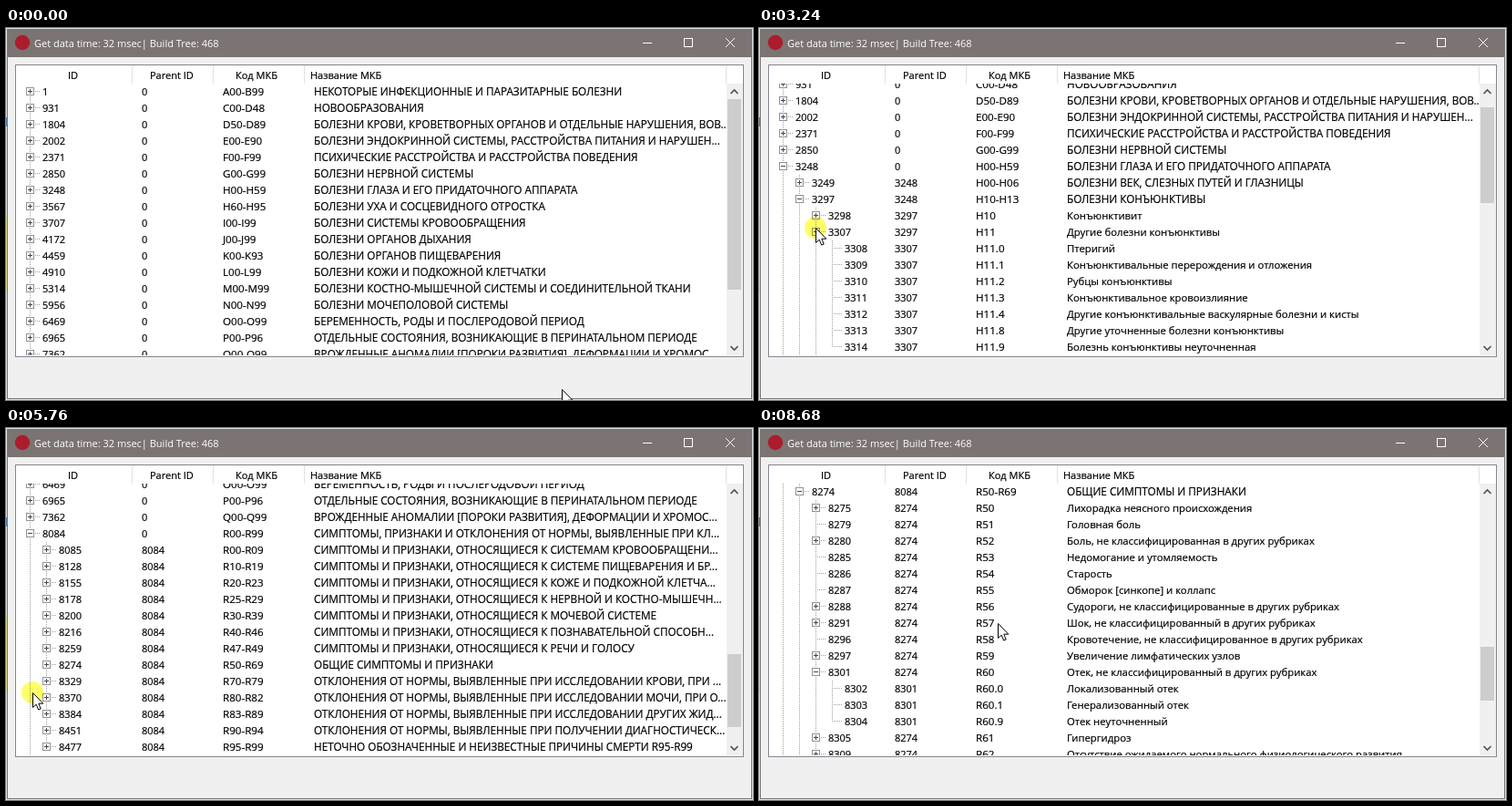
Animation of 820x408 px, one loop 9680 ms. Source, as an HTML page:

```html
<!DOCTYPE html>
<html lang="ru">
<head>
<meta charset="utf-8">
<title>Tree</title>
<style>
html, body { margin: 0; width: 100%; height: 100%; overflow: hidden; background: #f0f0f0; }
svg { display: block; }
text { font: 11px "Open Sans", "Noto Sans", sans-serif; fill: #000; stroke: #000; stroke-width: .2px; white-space: pre; }
.title { fill: #fff; stroke: none; }
.code { font-size: 11.6px; }
.caps { font-size: 11.73px; }
.mixed { font-size: 11.3px; }
.dots { fill: none; stroke: #a0a0a0; stroke-dasharray: 1 1; shape-rendering: crispEdges; }
.crisp { shape-rendering: crispEdges; }
</style>
</head>
<body>
<svg id="stage" width="820" height="408" viewBox="0 0 820 408">
  <defs><clipPath id="body"><rect x="11" y="61" width="779" height="298"/></clipPath></defs>
  <g class="crisp">
    <rect width="820" height="408" fill="#e2e2e2"/>
    <rect y="98" width="1" height="10" fill="#4a86b8"/>
    <rect y="206" width="1" height="84" fill="#e6e08a"/>
    <rect x="1" y="1" width="818" height="406" fill="#7b7472"/>
    <rect x="2" y="32" width="816" height="374" fill="#f0f0f0"/>
    <rect x="10" y="40" width="800" height="321" fill="#828790"/>
    <rect x="11" y="41" width="798" height="319" fill="#fff"/>
    <path d="M138.5 41V61M227.5 41V61M327.5 41V61M790.5 41V61" stroke="#e2e2e2"/>
    <rect x="791" y="61" width="18" height="298" fill="#f0f0f0"/>
    <path d="M699 16.5H709M744.5 11.5H753.5V20.5H744.5Z" fill="none" stroke="#fff"/>
  </g>
  <circle cx="18" cy="16" r="8.2" fill="#ab1d2c"/>
  <path d="M790 11L800 21M800 11L790 21" stroke="#fff"/>
  <text x="31" y="20.5" class="title">Get data time: 32 msec| Build Tree: 468</text>
  <text x="68" y="56">ID</text>
  <text x="158" y="56">Parent ID</text>
  <text x="252" y="56">Код МКБ</text>
  <text x="334" y="56">Название МКБ</text>
  <rect id="thumb" x="792" width="15" fill="#cdcdcd"/>
  <path d="M795.5 72L799.5 68L803.5 72M795.5 349L799.5 353L803.5 349" fill="none" stroke="#505050" stroke-width="1.6"/>
  <g id="rows" clip-path="url(#body)"></g>
  <circle id="halo" r="12" fill="#ffff6a" style="mix-blend-mode:multiply"/>
  <path id="cursor" d="M.5 .5V16.5L4.2 13.2 6.7 19 9.2 18 6.8 12.2H11.8Z" fill="#fff" stroke="#000"/>
</svg>
<script>
// One node per line: dots give the depth, "+" marks a node with children.
const source = `
+1 A00-B99 НЕКОТОРЫЕ ИНФЕКЦИОННЫЕ И ПАРАЗИТАРНЫЕ БОЛЕЗНИ
+931 C00-D48 НОВООБРАЗОВАНИЯ
+1804 D50-D89 БОЛЕЗНИ КРОВИ, КРОВЕТВОРНЫХ ОРГАНОВ И ОТДЕЛЬНЫЕ НАРУШЕНИЯ, ВОВ...
+2002 E00-E90 БОЛЕЗНИ ЭНДОКРИННОЙ СИСТЕМЫ, РАССТРОЙСТВА ПИТАНИЯ И НАРУШЕН...
+2371 F00-F99 ПСИХИЧЕСКИЕ РАССТРОЙСТВА И РАССТРОЙСТВА ПОВЕДЕНИЯ
+2850 G00-G99 БОЛЕЗНИ НЕРВНОЙ СИСТЕМЫ
+3248 H00-H59 БОЛЕЗНИ ГЛАЗА И ЕГО ПРИДАТОЧНОГО АППАРАТА
.+3249 H00-H06 БОЛЕЗНИ ВЕК, СЛЕЗНЫХ ПУТЕЙ И ГЛАЗНИЦЫ
.+3297 H10-H13 БОЛЕЗНИ КОНЪЮНКТИВЫ
..+3298 H10 Конъюнктивит
..+3307 H11 Другие болезни конъюнктивы
...3308 H11.0 Птеригий
...3309 H11.1 Конъюнктивальные перерождения и отложения
...3310 H11.2 Рубцы конъюнктивы
...3311 H11.3 Конъюнктивальное кровоизлияние
...3312 H11.4 Другие конъюнктивальные васкулярные болезни и кисты
...3313 H11.8 Другие уточненные болезни конъюнктивы
...3314 H11.9 Болезнь конъюнктивы неуточненная
..+3315 H13* Поражения конъюнктивы при болезнях, классифицированных в других рубри...
.+3321 H15-H22 БОЛЕЗНИ СКЛЕРЫ, РОГОВИЦЫ, РАДУЖНОЙ ОБОЛОЧКИ И ЦИЛИАРНОГО ТЕЛА
.+3376 H25-H28 БОЛЕЗНИ ХРУСТАЛИКА
.+3401 H30-H36 БОЛЕЗНИ СОСУДИСТОЙ ОБОЛОЧКИ И СЕТЧАТКИ
.+3446 H40-H42 ГЛАУКОМА
.+3460 H43-H45 БОЛЕЗНИ СТЕКЛОВИДНОГО ТЕЛА И ГЛАЗНОГО ЯБЛОКА
.+3483 H46-H48 БОЛЕЗНИ ЗРИТЕЛЬНОГО НЕРВА И ЗРИТЕЛЬНЫХ ПУТЕЙ
.+3498 H49-H52 БОЛЕЗНИ МЫШЦ ГЛАЗА, НАРУШЕНИЯ СОДРУЖЕСТВЕННОГО ДВИЖЕНИЯ ГЛА...
.+3532 H53-H54 ЗРИТЕЛЬНЫЕ РАССТРОЙСТВА И СЛЕПОТА
.+3552 H55-H59 ДРУГИЕ БОЛЕЗНИ ГЛАЗА И ЕГО ПРИДАТОЧНОГО АППАРАТА
+3567 H60-H95 БОЛЕЗНИ УХА И СОСЦЕВИДНОГО ОТРОСТКА
+3707 I00-I99 БОЛЕЗНИ СИСТЕМЫ КРОВООБРАЩЕНИЯ
+4172 J00-J99 БОЛЕЗНИ ОРГАНОВ ДЫХАНИЯ
+4459 K00-K93 БОЛЕЗНИ ОРГАНОВ ПИЩЕВАРЕНИЯ
+4910 L00-L99 БОЛЕЗНИ КОЖИ И ПОДКОЖНОЙ КЛЕТЧАТКИ
+5314 M00-M99 БОЛЕЗНИ КОСТНО-МЫШЕЧНОЙ СИСТЕМЫ И СОЕДИНИТЕЛЬНОЙ ТКАНИ
+5956 N00-N99 БОЛЕЗНИ МОЧЕПОЛОВОЙ СИСТЕМЫ
+6469 O00-O99 БЕРЕМЕННОСТЬ, РОДЫ И ПОСЛЕРОДОВОЙ ПЕРИОД
+6965 P00-P96 ОТДЕЛЬНЫЕ СОСТОЯНИЯ, ВОЗНИКАЮЩИЕ В ПЕРИНАТАЛЬНОМ ПЕРИОДЕ
+7362 Q00-Q99 ВРОЖДЕННЫЕ АНОМАЛИИ [ПОРОКИ РАЗВИТИЯ], ДЕФОРМАЦИИ И ХРОМОС...
+8084 R00-R99 СИМПТОМЫ, ПРИЗНАКИ И ОТКЛОНЕНИЯ ОТ НОРМЫ, ВЫЯВЛЕННЫЕ ПРИ КЛ...
.+8085 R00-R09 СИМПТОМЫ И ПРИЗНАКИ, ОТНОСЯЩИЕСЯ К СИСТЕМАМ КРОВООБРАЩЕНИ...
.+8128 R10-R19 СИМПТОМЫ И ПРИЗНАКИ, ОТНОСЯЩИЕСЯ К СИСТЕМЕ ПИЩЕВАРЕНИЯ И БР...
.+8155 R20-R23 СИМПТОМЫ И ПРИЗНАКИ, ОТНОСЯЩИЕСЯ К КОЖЕ И ПОДКОЖНОЙ КЛЕТЧА...
.+8178 R25-R29 СИМПТОМЫ И ПРИЗНАКИ, ОТНОСЯЩИЕСЯ К НЕРВНОЙ И КОСТНО-МЫШЕЧН...
.+8200 R30-R39 СИМПТОМЫ И ПРИЗНАКИ, ОТНОСЯЩИЕСЯ К МОЧЕВОЙ СИСТЕМЕ
.+8216 R40-R46 СИМПТОМЫ И ПРИЗНАКИ, ОТНОСЯЩИЕСЯ К ПОЗНАВАТЕЛЬНОЙ СПОСОБН...
.+8259 R47-R49 СИМПТОМЫ И ПРИЗНАКИ, ОТНОСЯЩИЕСЯ К РЕЧИ И ГОЛОСУ
.+8274 R50-R69 ОБЩИЕ СИМПТОМЫ И ПРИЗНАКИ
..+8275 R50 Лихорадка неясного происхождения
..8279 R51 Головная боль
..+8280 R52 Боль, не классифицированная в других рубриках
..8285 R53 Недомогание и утомляемость
..8286 R54 Старость
..8287 R55 Обморок [синкопе] и коллапс
..+8288 R56 Судороги, не классифицированные в других рубриках
..+8291 R57 Шок, не классифицированный в других рубриках
..8296 R58 Кровотечение, не классифицированное в других рубриках
..+8297 R59 Увеличение лимфатических узлов
..+8301 R60 Отек, не классифицированный в других рубриках
...8302 R60.0 Локализованный отек
...8303 R60.1 Генерализованный отек
...8304 R60.9 Отек неуточненный
..+8305 R61 Гипергидроз
..+8309 R62 Отсутствие ожидаемого нормального физиологического развития
..+8313 R63 Симптомы и признаки, относящиеся к приему пищи и жидкости
..8322 R64 Кахексия
..+8323 R68 Другие общие симптомы и признаки
..8328 R69 Неизвестные и неуточненные причины заболевания
.+8329 R70-R79 ОТКЛОНЕНИЯ ОТ НОРМЫ, ВЫЯВЛЕННЫЕ ПРИ ИССЛЕДОВАНИИ КРОВИ, ПРИ ...
.+8370 R80-R82 ОТКЛОНЕНИЯ ОТ НОРМЫ, ВЫЯВЛЕННЫЕ ПРИ ИССЛЕДОВАНИИ МОЧИ, ПРИ О...
.+8384 R83-R89 ОТКЛОНЕНИЯ ОТ НОРМЫ, ВЫЯВЛЕННЫЕ ПРИ ИССЛЕДОВАНИИ ДРУГИХ ЖИД...
.+8451 R90-R94 ОТКЛОНЕНИЯ ОТ НОРМЫ, ВЫЯВЛЕННЫЕ ПРИ ПОЛУЧЕНИИ ДИАГНОСТИЧЕСК...
.+8477 R95-R99 НЕТОЧНО ОБОЗНАЧЕННЫЕ И НЕИЗВЕСТНЫЕ ПРИЧИНЫ СМЕРТИ R95-R99
+8496 S00-T98 ТРАВМЫ, ОТРАВЛЕНИЯ И НЕКОТОРЫЕ ДРУГИЕ ПОСЛЕДСТВИЯ ВОЗДЕЙСТ...
+10210 V01-Y98 ВНЕШНИЕ ПРИЧИНЫ ЗАБОЛЕВАЕМОСТИ И СМЕРТНОСТИ
+11742 Z00-Z99 ФАКТОРЫ, ВЛИЯЮЩИЕ НА СОСТОЯНИЕ ЗДОРОВЬЯ НАСЕЛЕНИЯ И ОБР...`;

const LOOP = 9680, TICK = 40, ROW = 18, TOP = 61, VIEW = 298;
const openAt = { 3248: 1680, 3297: 2320, 3307: 3200, 8084: 5760, 8274: 6960, 8301: 7800 };
const HALO = 240;

// [time, scroll offset]
const scrolls = [[0, 0], [1680, 26], [3960, 80], [4080, 134], [4200, 188], [4400, 242],
  [4520, 350], [4560, 404], [4600, 458], [5760, 638], [6960, 828]];

// [start, end, x, y]
const moves = [[280, 1240, 36, 175], [1280, 1520, 26, 175], [1920, 2160, 47, 185],
  [2920, 3200, 62, 219], [3440, 3880, 154, 258], [4720, 5080, 35, 278],
  [5200, 5440, 30, 289], [5560, 5600, 29, 290], [6000, 6720, 46, 256],
  [7200, 7600, 64, 267], [8040, 8360, 262, 215], [8640, 8680, 262, 214]];

const $ = id => document.getElementById(id);
const add = (parent, tag, attrs, text) => {
  const el = document.createElementNS("http://www.w3.org/2000/svg", tag);
  for (const k in attrs) el.setAttribute(k, attrs[k]);
  if (text !== undefined) el.textContent = text;
  return parent.appendChild(el);
};

function parse(src) {
  const path = [];
  return src.trim().split("\n").map(line => {
    const [, dots, plus, id, code, name] = line.match(/^(\.*)(\+?)(\d+) (\S+) (.+)$/);
    const depth = dots.length, parent = path[depth - 1] || null;
    const node = { depth, id, code, name, parent, folder: !!plus, last: true, first: !path.length };
    // A later sibling means the previous one is not the last
    const prev = path[depth];
    if (prev && prev.parent === parent) prev.last = false;
    path[depth] = node;
    return node;
  });
}

function build(n) {
  const g = n.el = add($("rows"), "g");
  const x = 26 + ROW * n.depth;
  const mid = -.5;
  let d = `M${x + .5} ${n.first ? -1 : -9}V${n.last ? 0 : 9}M${x} ${mid}H${x + 12}`;
  for (let p = n.parent; p; p = p.parent)
    if (!p.last) d += `M${26 + ROW * p.depth + .5} -9V9`;
  add(g, "path", { d, class: "dots" });
  if (n.folder) {
    add(g, "rect", { x: x - 3.5, y: mid - 4, width: 8, height: 8, fill: "#fff", stroke: "#919191", class: "crisp" });
    add(g, "path", { d: `M${x - 2} ${mid}H${x + 3}`, stroke: "#404858", class: "crisp" });
    n.bar = add(g, "path", { d: `M${x + .5} ${mid - 2.5}v5`, stroke: "#404858", class: "crisp" });
  }
  const caps = n.name === n.name.toUpperCase();
  add(g, "text", { x: x + 14, y: 4 }, n.id);
  add(g, "text", { x: 149, y: 4 }, n.parent ? n.parent.id : "0");
  add(g, "text", { x: 238, y: 4, class: "code" }, n.code);
  add(g, "text", { x: 338, y: 4, class: caps ? "caps" : "mixed" }, n.name);
}

const nodes = parse(source);
nodes.forEach(build);

const isOpen = (n, t) => t >= openAt[n.id];
const shown = (n, t) => !n.parent || (isOpen(n.parent, t) && shown(n.parent, t));
const ease = u => u * u * (3 - 2 * u);

function cursorAt(t) {
  let x = 610, y = 396;
  for (const [a, b, tx, ty] of moves) {
    if (t <= a) break;
    const k = ease(Math.min(1, (t - a) / (b - a)));
    x += (tx - x) * k;
    y += (ty - y) * k;
  }
  return [Math.round(x), Math.round(y)];
}

function render(ms) {
  const t = Math.floor((ms % LOOP) / TICK) * TICK;
  const scroll = scrolls.filter(s => s[0] <= t).pop()[1];
  let count = 0;
  for (const n of nodes) {
    const y = TOP + 9 + ROW * count - scroll;
    const on = shown(n, t);
    if (on) count++;
    const visible = on && y > TOP - ROW && y < TOP + VIEW + ROW;
    n.el.setAttribute("display", visible ? "inline" : "none");
    if (!visible) continue;
    n.el.setAttribute("transform", `translate(0 ${y})`);
    if (n.bar) n.bar.setAttribute("display", isOpen(n, t) ? "none" : "inline");
  }
  const scale = 264 / (count * ROW);
  $("thumb").setAttribute("y", Math.round(78 + scroll * scale));
  $("thumb").setAttribute("height", Math.ceil(VIEW * scale));

  const at = `translate(${cursorAt(t).join(" ")})`;
  const lit = Object.values(openAt).some(c => t >= c && t < c + HALO);
  $("cursor").setAttribute("transform", at);
  $("halo").setAttribute("transform", at);
  $("halo").setAttribute("display", lit ? "inline" : "none");
}

const start = performance.now();
function loop() {
  render(performance.now() - start);
  requestAnimationFrame(loop);
}
loop();
</script>
</body>
</html>
```
